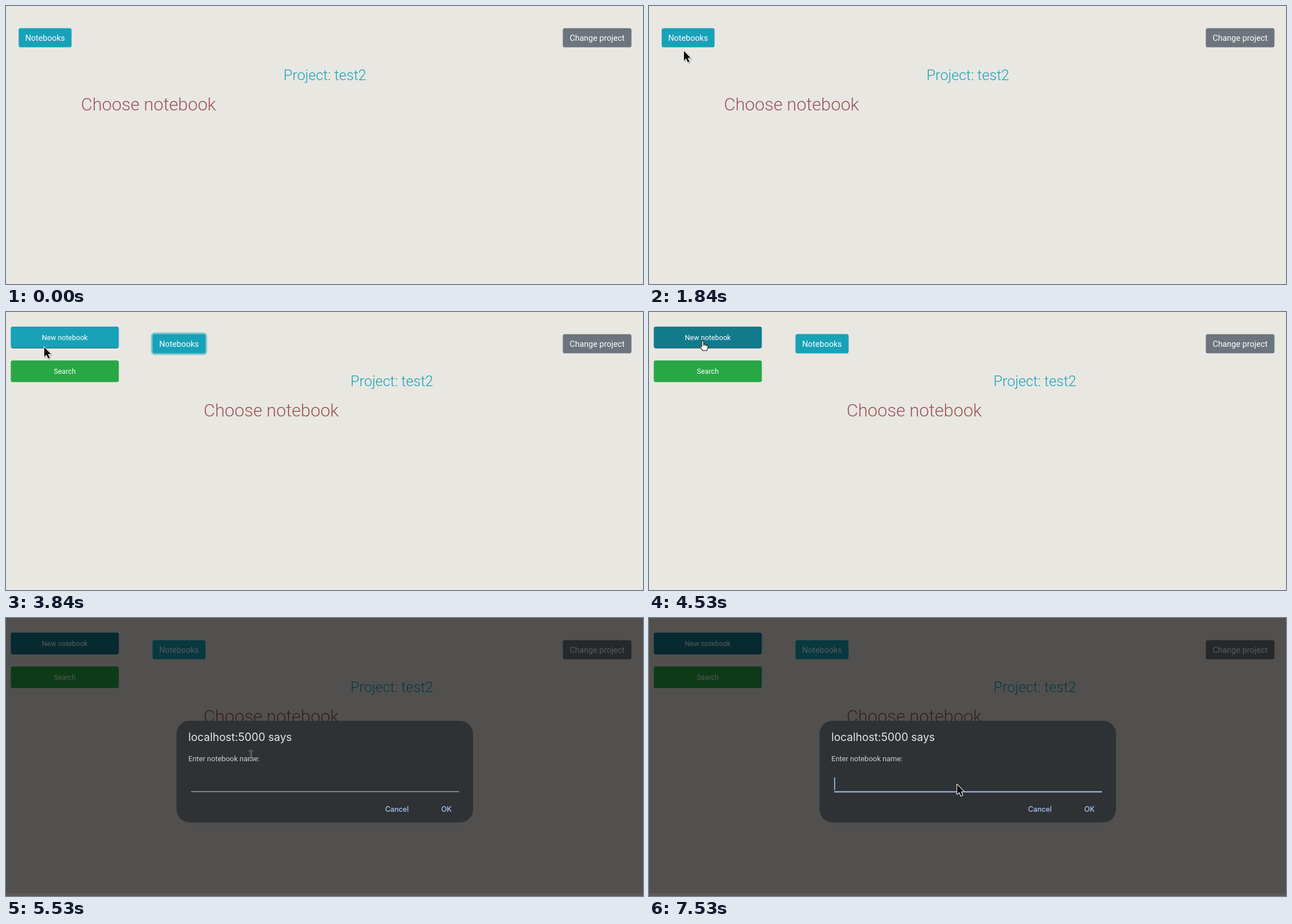
An HTML page with a canvas that plays this animation: 1132x495 px, repeating every 7990 ms.

```html
<!DOCTYPE html>
<html lang="en">
<head>
<meta charset="utf-8">
<title>Choose notebook</title>
<style>
  html, body { margin: 0; width: 100%; height: 100%; overflow: hidden; background: #e9e7e2; }
  canvas { display: block; width: 1132px; height: 495px; }
</style>
</head>
<body>
<canvas id="stage" width="1132" height="495"></canvas>
<script>
const ctx = document.getElementById('stage').getContext('2d');
const LOOP = 7990, FPS = 13;
const SLIDE_AT = 2521, BLUR_AT = 4455, DIALOG_AT = 4610, FOCUS_AT = 6530;
const ROBOTO = 'Roboto, sans-serif', INTER = 'Inter, sans-serif';

const clamp = v => Math.min(1, Math.max(0, v));
const lerp = (a, b, k) => a + (b - a) * k;

// CSS "ease" timing, solved by bisection
function ease(x) {
  const bez = (a, b, u) => 3 * a * u * (1 - u) ** 2 + 3 * b * u * u * (1 - u) + u ** 3;
  let lo = 0, hi = 1;
  for (let i = 0; i < 24; i++) {
    const mid = (lo + hi) / 2;
    if (bez(.25, .25, mid) < x) lo = mid; else hi = mid;
  }
  return bez(.1, 1, (lo + hi) / 2);
}
const ramp = (t, start, length = 150) => ease(clamp((t - start) / length));

// Info button tones: 0 rest, 1 hover, 2 pressed
const TONES = [[23, 162, 184], [19, 132, 150], [17, 122, 139]];
function infoColor(level) {
  const i = level > 1 ? 1 : 0;
  const rgb = TONES[i].map((c, n) => Math.round(lerp(c, TONES[i + 1][n], level - i)));
  return `rgb(${rgb})`;
}

function box(x, y, w, h, r, fill) {
  ctx.fillStyle = fill;
  ctx.beginPath();
  ctx.roundRect(x, y, w, h, r);
  ctx.fill();
}

function text(str, x, y, font, color, align = 'left') {
  ctx.font = font;
  ctx.fillStyle = color;
  ctx.textAlign = align;
  ctx.fillText(str, x, y);
}

function button(label, x, y, w, h, size, fill) {
  box(x, y, w, h, 3.6, fill);
  text(label, x + w / 2, y + h / 2 + size * .355, `${size}px ${ROBOTO}`, '#fff', 'center');
}

function drawPage(t) {
  ctx.fillStyle = '#e9e7e2';
  ctx.fillRect(0, 0, 1132, 495);

  const p = ramp(t, SLIDE_AT, 500);
  const x = 22.5 + 238 * p;
  const ring = ramp(t, 2430) - ramp(t, BLUR_AT, 200);
  if (ring > 0) {
    const s = 2.9 * ring;
    box(x - s, 39.5 - s, 94 + 2 * s, 34 + 2 * s, 3.6 + s, `rgba(58,176,195,${.3 + .3 * ring})`);
  }
  const level = ramp(t, 1990) + ramp(t, 2430) - ramp(t, 2530) - ramp(t, 2680);
  button('Notebooks', x, 39.5, 94, 34, 14.5, infoColor(level));
  button('Change project', 989.5, 39.5, 122, 34, 14.5, '#6c757d');

  text('Project: test2', 566.8 + 119 * p, 131.5, `300 25.5px ${ROBOTO}`, '#17a2b8', 'center');
  text('Choose notebook', 253.3 + 218 * p, 185.5, `300 31.2px ${ROBOTO}`, '#9c5558', 'center');

  if (p > 0) {
    const side = 8.5 - 238 * (1 - p);
    const press = ramp(t, BLUR_AT);
    const tone = infoColor(ramp(t, 3930) + press);
    button('New notebook', side, 26, 192, 38.5, 12.7, tone);
    if (press > 0) {
      ctx.fillStyle = '#0c5562';
      ctx.fillRect(side + 3, 63.6, 186, .9);
    }
    button('Search', side, 86.3, 192, 38.5, 12.7, '#28a745');
  }
}

function drawDialog(t) {
  ctx.fillStyle = 'rgba(0,0,0,.65)';
  ctx.fillRect(0, 0, 1132, 495);
  ctx.fillStyle = '#5c5a57';
  ctx.fillRect(0, 490, 1132, 5);

  box(303, 183, 527, 181, 23, '#2f3234');
  text('localhost:5000 says', 324, 219, `19.4px ${INTER}`, '#e6e6e6');
  text('Enter notebook name:', 324, 255, `13px ${ROBOTO}`, '#cdcfcf');
  text('Cancel', 694.7, 344.7, `500 12.6px ${INTER}`, '#a8c7fa', 'center');
  text('OK', 782.8, 344.7, `500 12.8px ${INTER}`, '#a8c7fa', 'center');

  const focused = t >= FOCUS_AT;
  ctx.fillStyle = focused ? '#a8c7fa' : '#c4c7c5';
  ctx.fillRect(329, focused ? 308.5 : 308.6, 476, focused ? 2 : 1.1);
  if (focused && (t < 6990 || t >= 7530)) ctx.fillRect(329, 284, 1.6, 22.5);
}

// Pointer stops: time, x, y
const PATH = [
  [380, 430, 230], [770, 300, 281], [1150, 130, 279], [1500, 8, 190],
  [1846, 62, 80], [2000, 64.5, 67], [2160, 64.5, 64], [3770, 64.5, 64],
  [4460, 95.5, 51], [5231, 95.5, 51], [5538, 435, 244.5], [5700, 545, 325],
  [5850, 547.5, 329], [6077, 547.5, 311], [6385, 547.5, 296.5], [LOOP, 547.5, 296.5]
];
function pointerAt(t) {
  const i = Math.max(1, PATH.findIndex(s => s[0] >= t));
  const [t0, x0, y0] = PATH[i - 1], [t1, x1, y1] = PATH[i];
  const k = clamp((t - t0) / (t1 - t0));
  return [lerp(x0, x1, k), lerp(y0, y1, k)];
}

const ARROW = new Path2D('M0 0V17.2L3.9 13.6L7 20.3L9.8 19L6.8 12.5H12Z');
const HAND = new Path2D('M-1.7 11V1.6a1.6 1.6 0 0 1 3.2 0V6.3Q3.4 5.6 4.2 7Q6 6.2 6.7 7.8' +
  'Q9 7.2 9 9.6V12Q9 14.4 7.6 16V17.8H-.6V16.4Q-3 14 -5.2 10.8Q-4.6 8.4 -1.7 11Z' +
  'M1.5 6.3V9.5M4.2 7V9.6M6.7 7.8V9.9');
const BEAM = new Path2D('M-3.5 -8H-1.2L0 -7L1.2 -8H3.5M0 -7V7M-3.5 8H-1.2L0 7L1.2 8H3.5');

function stroke(path, color, width) {
  ctx.strokeStyle = color;
  ctx.lineWidth = width;
  ctx.stroke(path);
}

function drawPointer(t) {
  if (t < 380) return;
  const [x, y] = pointerAt(t);
  const onNotebooks = t < 2600 && x > 22 && x < 117 && y < 73;
  const onNew = t > 3900 && t < 5250 && y < 62;
  const onLabel = t > DIALOG_AT && x > 325 && x < 450 && y > 238 && y < 262;

  ctx.save();
  ctx.translate(x, y);
  ctx.lineJoin = 'round';
  if (onNotebooks || onNew) {
    ctx.fillStyle = '#fff';
    ctx.fill(HAND);
    stroke(HAND, '#111', 1.1);
  } else if (onLabel) {
    stroke(BEAM, 'rgba(255,255,255,.6)', 2.6);
    stroke(BEAM, '#16181a', 1.2);
  } else {
    ctx.shadowColor = 'rgba(0,0,0,.35)';
    ctx.shadowBlur = 2;
    ctx.shadowOffsetX = ctx.shadowOffsetY = 1;
    stroke(ARROW, '#fff', 2.2);
    ctx.shadowColor = 'transparent';
    ctx.fillStyle = '#0a0a0a';
    ctx.fill(ARROW);
  }
  ctx.restore();
}

const start = performance.now();
function tick() {
  const now = (performance.now() - start) % LOOP;
  // Motion advances in 13 steps per second
  const t = Math.floor((now + 9) * FPS / 1000) * 1000 / FPS;
  drawPage(t);
  if (t >= DIALOG_AT) drawDialog(t);
  drawPointer(t);
  requestAnimationFrame(tick);
}
tick();
</script>
</body>
</html>
```
